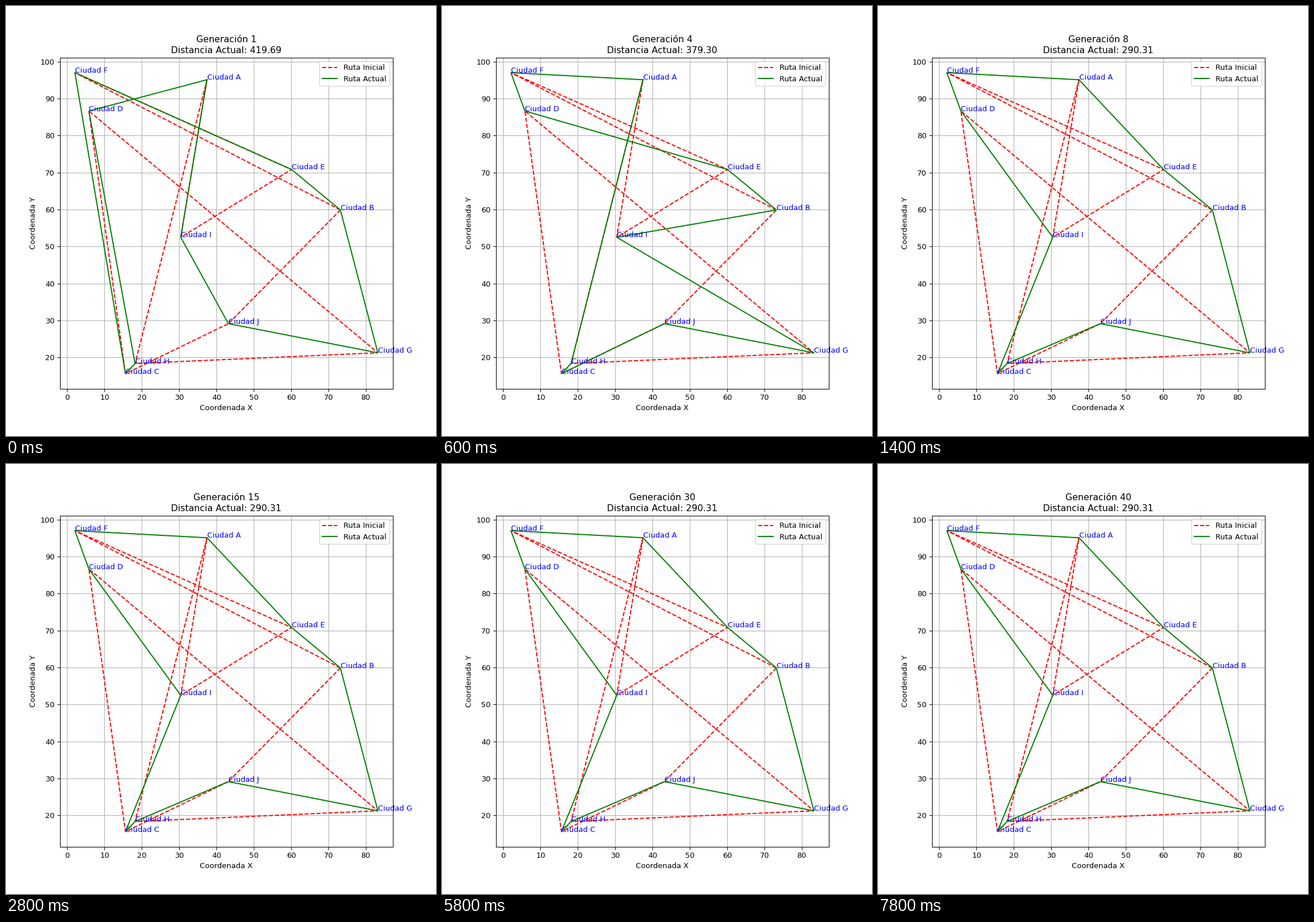
A matplotlib script that plays this animation: 748 by 748 pixels, repeating every 8 s.

```python
import numpy as np
import matplotlib.pyplot as plt
from matplotlib.animation import FuncAnimation

FRAMES, INTERVAL = 40, 200
NAMES = "ABCDEFGHIJ"

np.random.seed(42)
cities = np.random.rand(len(NAMES), 2) * 100

INITIAL = "BJCDGHAIEF"
# First generation in which each route is the best one
BEST = [(1, "ADHCFEBGJI"),
        (3, "AFDEBIGJCH"),
        (6, "ADFEBGJCHI"),
        (8, "AEBGJHCIDF")]


def closed(route):
    idx = [NAMES.index(c) for c in route + route[0]]
    return cities[idx]


def length(path):
    return np.hypot(*np.diff(path, axis=0).T).sum()


plt.rcParams["font.family"] = "DejaVu Sans"
fig, ax = plt.subplots(figsize=(8, 8), dpi=93.5)
ax.plot(*closed(INITIAL).T, "r--", label="Ruta Inicial")
current, = ax.plot(*closed(BEST[0][1]).T, "g-", label="Ruta Actual")
for name, (x, y) in zip(NAMES, cities):
    ax.text(x, y, f"Ciudad {name}", color="blue", fontsize=10)
ax.set_xlabel("Coordenada X")
ax.set_ylabel("Coordenada Y")
ax.grid(True)
ax.legend(loc="upper right")
title = ax.set_title("", linespacing=1.33)


def update(frame):
    gen = frame + 1
    route = [r for start, r in BEST if start <= gen][-1]
    path = closed(route)
    current.set_data(*path.T)
    title.set_text(f"Generación {gen}\nDistancia Actual: {length(path):.2f}")
    return current, title


anim = FuncAnimation(fig, update, frames=FRAMES, interval=INTERVAL,
                     init_func=lambda: update(0), repeat=True, repeat_delay=0)
plt.show()
```
